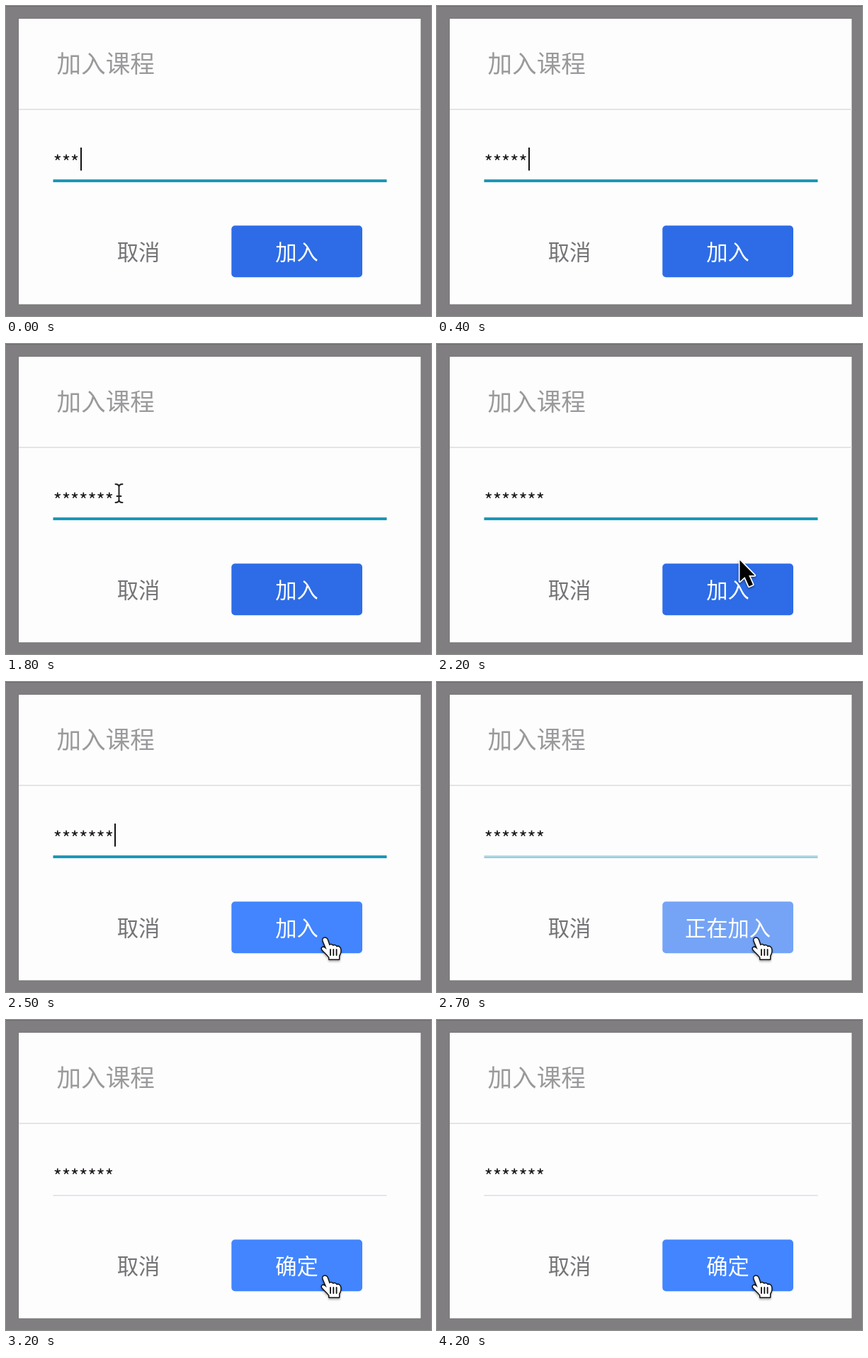
Animation, 600 px wide and 438 px high, one loop 4500 ms. Source, as an HTML page with a canvas:

```html
<!DOCTYPE html>
<html lang="zh-CN">
<head>
<meta charset="utf-8">
<title>加入课程</title>
<style>
html, body { margin: 0; width: 600px; height: 438px; overflow: hidden; background: #807e80; }
canvas { display: block; }
</style>
</head>
<body>
<canvas id="stage" width="600" height="438"></canvas>
<script>
const ctx = document.getElementById('stage').getContext('2d');
const FONT = '"Noto Sans CJK SC", "Noto Sans CJK", sans-serif';
const LOOP = 4500, STEP = 100;

const ARROW = new Path2D('M0 0V30L7 23.5L13 37L18.5 34.5L12.7 21.5H21Z');
const HAND = new Path2D('M4 1C7 0 8.5 2 9.3 5L11.5 11.5C13 9.3 15.7 10 16.5 12' +
  'C18.5 10.4 21 11.3 21.6 13.5C24 12 26.5 13.3 27 16.5C27.8 21 26.3 23.5 25 26V30.5' +
  'H11.5V28C9 24.5 5.5 21.5 2 17.8C-.5 14.5 2.6 12.8 5 14.8L7.8 17L3.2 6C2.2 3.5 2 2 4 1Z');
const FINGERS = new Path2D('M13 17V25M17.3 17V25M21.6 17V25');
const BEAM = new Path2D('M-5 -13C-2 -13 0 -12 0 -9V9C0 12 -2 13 -5 13M5 -13C2 -13 0 -12 0 -9M0 9C0 12 2 13 5 13M-3 4H3');

const clamp = v => Math.max(0, Math.min(1, v));
const mix = (a, b, k) => `rgb(${a.map((v, i) => Math.round(v + (b[i] - v) * k)).join()})`;

function rect(x, y, w, h, color) {
  ctx.fillStyle = color;
  ctx.fillRect(x, y, w, h);
}

function text(str, x, y, size, color, align = 'center') {
  ctx.font = `400 ${size}px ${FONT}`;
  ctx.textAlign = align;
  ctx.fillStyle = color;
  ctx.fillText(str, x, y);
}

function line(path, width, color) {
  ctx.lineWidth = width;
  ctx.strokeStyle = color;
  ctx.stroke(path);
}

function outlined(path, fill, edge, width) {
  ctx.save();
  ctx.shadowColor = 'rgba(0,0,0,.35)';
  ctx.shadowBlur = 3;
  ctx.shadowOffsetY = 2;
  line(path, width, edge);
  ctx.restore();
  ctx.fillStyle = fill;
  ctx.fill(path);
}

const pointers = {
  beam() {
    line(BEAM, 4, '#fff');
    line(BEAM, 2, '#222');
  },
  arrow() { outlined(ARROW, '#000', '#fff', 3.4); },
  hand() {
    outlined(HAND, '#fff', '#111', 3);
    line(FINGERS, 1.8, '#111');
  }
};

// start time, shape, x, y
const pointerTrack = [
  [1700, 'beam', 133.5, 211],
  [1800, 'beam', 159.5, 211],
  [2000, 'arrow', 220, 228],
  [2100, 'arrow', 340, 270],
  [2200, 'arrow', 427.5, 305.5],
  [2300, 'arrow', 445, 345],
  [2400, 'hand', 445, 360],
  [2500, 'hand', 445, 361]
];

function drawPointer(t) {
  const state = pointerTrack.filter(p => p[0] <= t).pop();
  if (!state) return;
  ctx.save();
  ctx.translate(state[2], state[3]);
  ctx.lineJoin = ctx.lineCap = 'round';
  pointers[state[1]]();
  ctx.restore();
}

function drawInput(t) {
  const typedAt = [200, 400, 700, 1300].filter(at => at <= t);
  const count = 3 + typedAt.length;
  const sinceKey = t - (typedAt.pop() || 0);

  ctx.font = `500 26px ${FONT}`;
  ctx.textAlign = 'center';
  ctx.fillStyle = '#1c1a1c';
  const box = ctx.measureText('*');
  const y = 213.5 + (box.actualBoundingBoxAscent - box.actualBoundingBoxDescent) / 2;
  for (let i = 0; i < count; i++) ctx.fillText('*', 72.8 + 12.17 * i, y);

  if (t < 2600 && sinceKey % 1000 < 500) rect(69 + 12 * count, 200, 2, 32.5, '#111');

  rect(66.5, 247, 471, 1.8, '#e2e2e8');
  ctx.globalAlpha = 1 - clamp((t - 2500) / 300);
  rect(66.5, 245, 471, 4, '#1d97b5');
  ctx.globalAlpha = 1;
}

function drawButton(t) {
  const idle = [45, 108, 230], hover = [66, 133, 255], busy = [143, 179, 242];
  let color = mix(idle, hover, clamp((t - 2200) / 200));
  if (t >= 2600) color = mix(hover, busy, clamp((t - 2500) / 300));
  if (t >= 3200) color = mix(hover, hover, 0);
  ctx.fillStyle = color;
  ctx.beginPath();
  ctx.roundRect(318.3, 310.2, 184.7, 73, 5);
  ctx.fill();
  const label = t >= 3200 ? '确定' : t >= 2700 ? '正在加入' : '加入';
  text(label, 410.5, 358.5, 30.3, '#fff');
}

function draw(t) {
  rect(0, 0, 600, 438, '#807e80');
  rect(0, 0, 600, 1, '#6c6a6c');
  rect(17.5, 17.5, 569, 405, '#747274');
  rect(18, 18, 567.5, 403.5, '#fefdfe');
  rect(18, 145.2, 567.5, 1.8, '#e2e1e5');
  text('加入课程', 71.5, 94, 34.6, '#9a999b', 'left');
  drawInput(t);
  text('取消', 187, 358.5, 30.3, '#747376');
  drawButton(t);
  drawPointer(t);
}

function tick() {
  const t = performance.now() % LOOP;
  draw(Math.floor(t / STEP) * STEP);
  requestAnimationFrame(tick);
}
tick();
</script>
</body>
</html>
```
